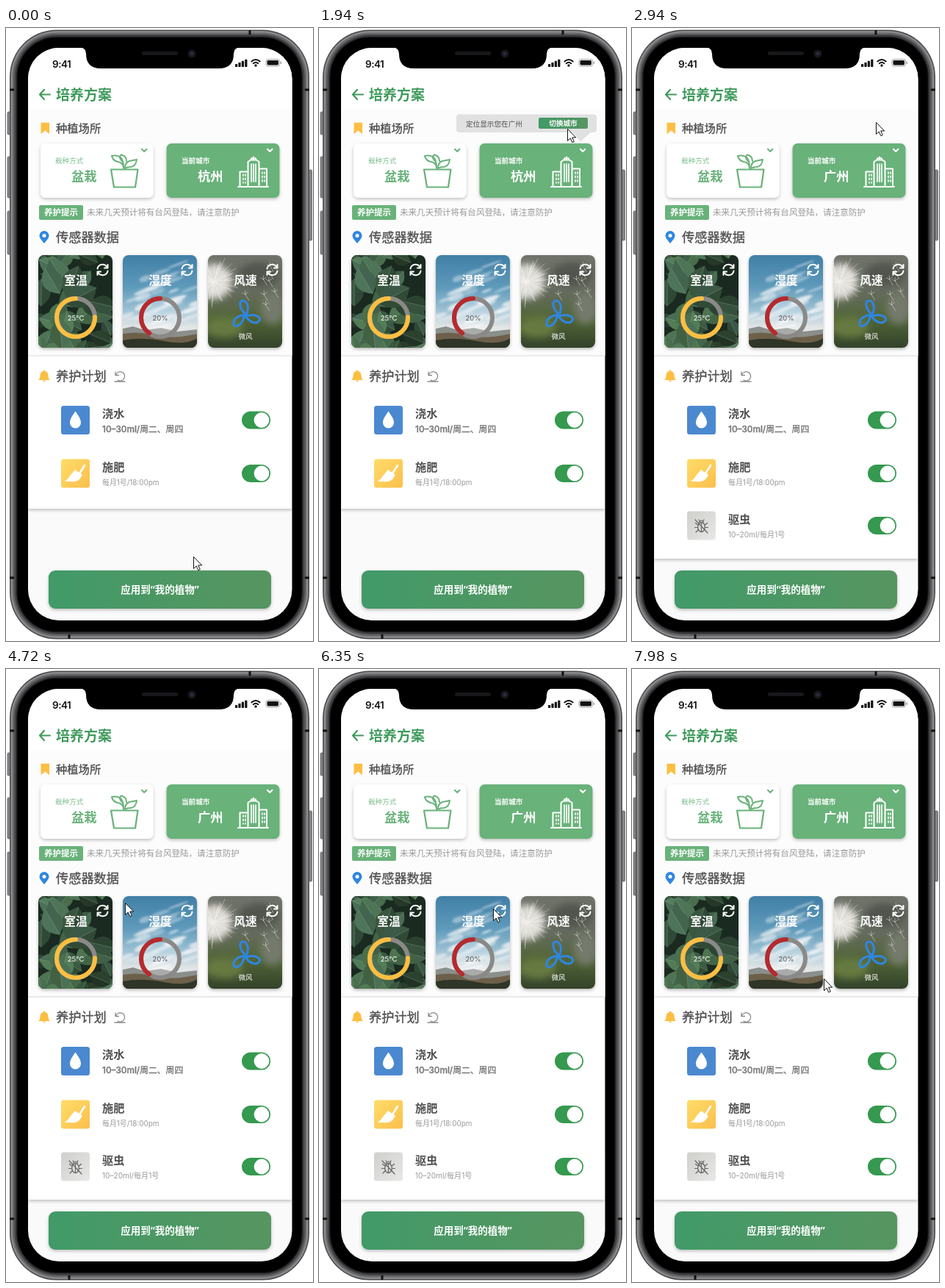
An HTML page for the animation above (8 s loop, 418 by 834 pixels).

```html
<!DOCTYPE html>
<html lang="zh-CN">
<head>
<meta charset="utf-8">
<title>培养方案</title>
<style>
html, body { margin: 0; width: 100%; height: 100%; overflow: hidden; background: #fff; }
svg { position: absolute; left: 0; top: 0; display: block; }
text { font-family: Inter, "Noto Sans CJK SC", "Noto Sans CJK", sans-serif; }
.card { top: 308.5px; border-radius: 8px; box-shadow: 0 2px 4px rgba(0,0,0,.28); }
</style>
</head>
<body>
<script>
const GREEN = '#69b27a', DEEP = '#35994f', AMBER = '#fdbe42', BLUE = '#2f86e0', INK = '#505050';
const LOOP = 8000, TICK = 77.4;

// cy is the optical middle of the line; weight 500 gets a hairline so it reads as medium
function label(s, x, cy, size, fill, weight = 400, anchor = 'start', extra = '') {
  const medium = weight === 500 ? `stroke="${fill}" stroke-width=".35"` : '';
  return `<text x="${x}" y="${cy + size * 0.37}" font-size="${size}" fill="${fill}" font-weight="${weight}" text-anchor="${anchor}" ${medium} ${extra}>${s}</text>`;
}
function box(x, y, w, h, r, fill, extra = '') {
  return `<rect x="${x}" y="${y}" width="${w}" height="${h}" rx="${r}" fill="${fill}" ${extra}/>`;
}
function line(d, color, width, extra = '') {
  return `<path d="${d}" fill="none" stroke="${color}" stroke-width="${width}" stroke-linecap="round" stroke-linejoin="round" ${extra}/>`;
}
function shape(d, fill, extra = '') { return `<path d="${d}" fill="${fill}" ${extra}/>`; }
function at(x, y, body, extra = '') { return `<g transform="translate(${x} ${y}) ${extra}">${body}</g>`; }
function grad(id, stops, dir = 'x2="0" y2="1"') {
  const list = stops.map(([o, c]) => `<stop offset="${o}" stop-color="${c}"/>`).join('');
  return `<linearGradient id="${id}" x1="0" y1="0" ${dir}>${list}</linearGradient>`;
}
function seeded(seed) {
  return () => (seed = (seed * 16807) % 2147483647) / 2147483647;
}
function repeat(n, fn) { return Array.from({ length: n }, (_, i) => fn(i)).join(''); }
function addSvg(w, h, body, cls = '') {
  const host = document.createElement('div');
  host.innerHTML = `<svg class="${cls}" width="${w}" height="${h}" viewBox="0 0 ${w} ${h}">${body}</svg>`;
  return document.body.appendChild(host.firstChild);
}

// ---- phone body ----
const phone = () => {
  const keys = [[2, 114, 31], [2, 175, 56], [2, 249, 59], [412.5, 193, 96]]
    .map(([x, y, h]) => box(x, y, 4, h, 1.5, '#858587', 'stroke="#4a4a4c" stroke-width=".7"')).join('');
  const rings = [[0, '#4a4a4c'], [1.5, '#88898b'], [4, '#646567'], [6.5, '#414143'], [9, '#1d1d1f'], [10.5, '#000']]
    .map(([d, c]) => box(5 + d, 2.5 + d, 408 - 2 * d, 829 - 2 * d, 64 - d, c)).join('');
  return keys + rings +
    '<path d="M5 84h6M5 748h6M407 84h6M407 748h6M332 3v6M86 825v6" stroke="#111" stroke-width="3"/>';
};

const notch = shape('M100 26q9 1 9 9q0 20 20 20H290q20 0 20-20q0-8 9-9z', '#000') +
  box(185, 32, 49, 5, 2.5, '#17181a') +
  '<circle cx="253" cy="35" r="5.5" fill="#17181d"/><circle cx="253" cy="35" r="2.4" fill="#2b2c3c"/>';

const status = label('9:41', 63, 49, 13.5, '#111', 600, 'start', 'letter-spacing="-.5"') +
  repeat(4, i => box(312 + i * 4.4, 49 - i * 2.1, 3.2, 4 + i * 2.1, 0.7, '#111')) +
  line('M334.3 45.4Q340 40.6 345.7 45.4M336.7 48.2Q340 45.4 343.3 48.2', '#111', 2) +
  '<circle cx="340" cy="51" r="1.7" fill="#111"/>' +
  box(354, 42.5, 18.5, 9.5, 2.6, 'none', 'stroke="#999" stroke-width=".9"') +
  box(355.5, 44, 15.5, 6.5, 1.4, '#111') + box(373.6, 45.6, 1.3, 3.4, 0.6, '#999');

// ---- page content ----
const chevron = (x, color) => line(`M${x - 3.3} 164.8L${x} 168L${x + 3.3} 164.8`, color, 2);

const pot = line('M143 192.5H179.5L176 216.5H147Z', GREEN, 2.2) +
  line('M160 191Q160 183 152 182Q145 180 144 174Q152 172 157 177Q160 181 160 190', GREEN, 2) +
  line('M159 182Q152 176 157 172.5Q164 174 164 181', GREEN, 2) +
  line('M162 191Q162 183 168 181L178 179Q177 188 170 189Q165 189 162 191', GREEN, 2);

const towers = line('M316 216H357M318.5 215V195.5H328M329.5 215V182L333 179.5H341L344.5 182V215M346 191.5H355V215M337 179V175.5', '#fff', 2) +
  line('M334 185V209M340 185V209M337 185V209', '#fff', 1.7) +
  line('M323 199V211M326 199V211M349 196V211M352 196V211', '#fff', 1.6, 'stroke-dasharray="2.2 3.2"') +
  line('M334 179V177H340V179', '#fff', 1.6);

const city = (name, extra) => label(name, 261, 202, 17.3, '#fff', 700, 'start', extra);

const place =
  shape('M47.5 128.700h11.500v15.500l-5.750-4.600l-5.750 4.600z', AMBER) +
  label('种植场所', 68, 136.7, 15.3, INK, 500) +
  box(47, 157, 153.5, 74, 7, '#fff', 'filter="url(#soft)"') +
  label('栽种方式', 67, 180, 9.6, '#7fbf90') + label('盆栽', 89, 202, 17.3, GREEN, 700) +
  pot + chevron(188.2, GREEN) +
  box(218.5, 157, 154, 74, 7, GREEN, 'filter="url(#soft)"') +
  label('当前城市', 239, 180, 9.6, '#fff', 500) +
  city('杭州', 'id="cityOld"') + city('广州', 'id="cityNew"') +
  towers + chevron(359.2, '#fff') +
  box(45, 241, 60, 20, 2, GREEN) +
  label('养护提示', 52, 251, 11.5, '#fff', 700) +
  label('未来几天预计将有台风登陆，请注意防护', 110, 251, 11.55, '#999');

const sensors =
  shape('M52 293C47 287 45.500 285 45.500 282.500A6.500 6.500 0 0 1 58.500 282.500C58.500 285 57 287 52 293Z', BLUE) +
  '<circle cx="52" cy="282.500" r="2.5" fill="#fff"/>' +
  label('传感器数据', 68, 285, 17.2, INK, 500);

const bell = shape('M52 465.500q1.500 0 1.500 1.400q4 1.200 4 6q0 4 2.500 6.100h-16q2.500-2.100 2.500-6.100q0-4.800 4-6q0-1.400 1.500-1.400zM50 479.500h4q-.4 1.800-2 1.800t-2-1.800z', AMBER);
const reset = line('M149 468V472.500H153.500M149.500 472A6.200 6.200 0 1 1 152 479M148 481H162', '#8a8a8a', 1.3);

const drop = shape('M94.500 521.500C99 528 102 532 102 537A7.500 7.500 0 0 1 87 537C87 532 90 528 94.500 521.500Z', '#fff');
const spade = line('M99.500 607L107 595', '#fff', 2.6) +
  shape('M94 601l10 7l-4 6q-5 4-12 3h-8q5-4 8-9z', '#fff');
const bug = `<ellipse cx="94.500" cy="679" rx="4.800" ry="6.500" fill="none" stroke="#666" stroke-width="1.300"/>` +
  line('M94.500 673V685M91.500 672Q94.500 668 97.500 672M91 669L92.500 671M98 669L96.500 671M89.500 676L86.500 673.500M89.500 679.500H85.500M90 683L87 686M99.500 676L102.500 673.500M99.500 679.500H103.500M99 683L102 686M86 669L103 687', '#666', 1.2);

function row(cy, fill, icon, title, sub, size, color, weight) {
  return box(75, cy - 19.5, 39, 39, 3.5, fill) + icon +
    label(title, 131, cy - 9, 15.2, INK, 700) + label(sub, 131, cy + 12.5, size, color, weight) +
    box(321, cy - 12, 39, 24, 12, DEEP) + `<circle cx="348" cy="${cy}" r="10.400" fill="#fff"/>`;
}

const sheet = h => box(30, 447, 359, h, 0, '#fff', 'filter="url(#soft)"');
const plan = sheet(207) +
  '<g id="more">' + sheet(275) +
  row(677, 'url(#silver)', bug, '驱虫', '10–20ml/每月1号', 10.1, '#999') + '</g>' +
  box(30, 445, 359, 1.2, 0, '#e9e9e9') + bell + reset +
  label('养护计划', 68, 474, 17.2, INK, 500) +
  row(533.5, '#4a88d0', drop, '浇水', '10–30ml/周二、周四', 11.8, '#777', 500) +
  row(606, 'url(#gold)', spade, '施肥', '每月1号/18:00pm', 9.9, '#999');

const apply = box(58, 738, 303, 52, 9, 'url(#leaf)', 'filter="url(#soft)"') +
  label('应用到“我的植物”', 209.5, 764.5, 13.5, '#fff', 700, 'middle',
    `style="font-family:'Noto Sans','Noto Sans CJK SC',sans-serif"`);

const tip = '<g id="tip">' +
  shape('M191 117.500H374Q378 117.500 378 121.500V138Q378 142 374 142H370L356 154.500L345 142H191Q187 142 187 138V121.500Q187 117.500 191 117.500Z', '#e1e1e1') +
  label('定位显示您在广州', 200, 130, 9.65, '#4d4d4d') +
  box(299, 122, 67, 15, 2, 'url(#leaf)') +
  label('切换城市', 332.5, 129.7, 9.6, '#fff', 500, 'middle') + '</g>';

addSvg(418, 834, `<defs>
  <filter id="soft" x="-10%" y="-20%" width="120%" height="150%"><feDropShadow dx="0" dy="2" stdDeviation="2" flood-opacity=".24"/></filter>
  <clipPath id="screen"><rect x="30" y="27" width="359.500" height="779" rx="42"/></clipPath>
  ${grad('leaf', [[0, '#419a68'], [1, '#579561']], 'x2="1" y2="0"')}
  ${grad('gold', [[0, '#ffdc69'], [1, '#fbbf4c']], 'x2="1" y2="1"')}
  ${grad('silver', [[0, '#cfcfcc'], [1, '#e8e8e7']], 'x2="1" y2="1"')}
  </defs>` + phone() + '<g clip-path="url(#screen)">' +
  box(30, 27, 360, 780, 0, '#fafafa') + box(30, 27, 360, 83, 0, '#fff') + box(30, 110, 360, 336, 0, '#fcfcfc') +
  line('M60 90.500H46.500M52 84L46 90.500L52 97', '#3f9b5c', 2.2) +
  label('培养方案', 68, 90.5, 19, '#3f9b5c', 700) +
  place + sensors + plan + apply + tip + '</g>' + notch + status);

// ---- sensor cards ----
const refresh = at(87.5, 20, line('M-7 -1.500A7 7 0 0 1 5.500 -4.500M7 -7V-2.500H2.500M7 1.500A7 7 0 0 1 -5.500 4.500M-7 7V2.500H-2.500', '#fff', 2));

function ring(share, color, text, ink) {
  const len = 2 * Math.PI * 26;
  const circle = `<circle r="26" fill="none" stroke-width="6"`;
  return at(51, 85, `${circle} stroke="#8b8987"/>` +
    `${circle} stroke="${color}" stroke-linecap="round" stroke-dasharray="${len * share} ${len}" transform="scale(-1 1) rotate(-90)"/>` +
    label(text, 0, 0, 9.5, ink, 400, 'middle'));
}

function leaves() {
  const rnd = seeded(41);
  return box(0, 0, 101, 126, 0, '#1a2a20') + repeat(40, i => {
    const l = 24 + rnd() * 24, w = l * 0.68, light = 15 + rnd() * 22;
    const tone = k => `hsl(${122 + rnd() * 20} 20% ${light + k}%)`;
    return at(rnd() * 101, rnd() * 136,
      shape(`M0 0Q${w} ${-l / 2} 0 ${-l}Q${-w} ${-l / 2} 0 0Z`, tone(0)) +
      shape(`M0 0Q${w} ${-l / 2} 0 ${-l}Z`, tone(5)) +
      line(`M0 0V${-l}`, '#9ab696', 0.6, 'opacity=".5"'), `rotate(${rnd() * 360})`);
  });
}

function sky() {
  const rnd = seeded(7);
  return `<defs>${grad('sky', [[0, '#417fa6'], [0.35, '#5f9abb'], [0.6, '#9fc2d4'], [0.78, '#e3e6e6']])}
    <filter id="mist"><feGaussianBlur stdDeviation="1.500"/></filter></defs>` +
    box(0, 0, 101, 126, 0, 'url(#sky)') + '<g filter="url(#mist)">' +
    repeat(34, () => `<ellipse cx="${rnd() * 101}" cy="${14 + rnd() * 84}" rx="${7 + rnd() * 15}" ry="${1 + rnd() * 3}" fill="#f4f6f7" opacity="${0.3 + rnd() * 0.5}" transform="rotate(-20 50 60)"/>`) +
    '</g>' + shape('M0 100L14 97L30 102L52 99L74 104L101 101V126H0Z', '#8b8f8c') +
    shape('M0 107Q22 103 44 109T101 107V126H0Z', '#6d604a') +
    shape('M0 116Q25 111 56 117T101 113V126H0Z', '#2f3527');
}

function dandelion() {
  const rnd = seeded(23);
  const seeds = repeat(80, () => {
    const a = rnd() * Math.PI * 2, r = 14 + rnd() * 22;
    return line(`M8 36L${8 + r * Math.cos(a)} ${36 + r * Math.sin(a)}`, '#f2f0ec', 0.8, 'opacity=".5"');
  });
  return `<defs>${grad('field', [[0, '#70736b'], [0.4, '#656b5e'], [0.68, '#526638'], [1, '#33422a']])}
    <filter id="blur" x="-50%" y="-50%" width="200%" height="200%"><feGaussianBlur stdDeviation="5"/></filter></defs>` +
    box(0, 0, 101, 126, 0, 'url(#field)') + '<g filter="url(#blur)">' +
    '<circle cx="8" cy="36" r="24" fill="#dddbd5"/><ellipse cx="70" cy="26" rx="28" ry="16" fill="#51554d"/>' +
    '<ellipse cx="22" cy="98" rx="26" ry="14" fill="#66793f"/><ellipse cx="88" cy="72" rx="16" ry="22" fill="#757a6c"/></g>' +
    seeds + repeat(9, () => {
      const x = 45 + rnd() * 48, y = 8 + rnd() * 62;
      return line(`M${x} ${y}l5 8m-5 -8l-4 -2m4 2l0 -5m0 5l4 -3`, '#eeece6', 0.8, 'opacity=".6"');
    });
}

const fan = at(51, 82, repeat(3, i =>
  line('M-1 -3C-8 -9 -9 -20 -4 -20C3 -20 5 -11 2 -3', BLUE, 3, `transform="rotate(${i * 120})"`)) +
  `<circle r="3" fill="${BLUE}"/>`);

function card(x, photo, title, gauge) {
  const el = addSvg(101, 126, photo + label(title, 51, 34, 15.7, '#fff', 700, 'middle') + refresh + gauge, 'card');
  el.style.left = x + 'px';
  return el;
}
const cards = [
  card(44, leaves(), '室温', ring(0.75, AMBER, '25℃', '#fff')),
  card(159, sky(), '湿度', '<circle cx="51" cy="85" r="24" fill="#fff" opacity=".25"/>' + ring(0.4, '#b62a2e', '20%', '#555')),
  card(274.5, dandelion(), '风速', fan + label('微风', 51, 110, 9.6, '#fff', 400, 'middle'))
];

addSvg(418, 834, '<g id="mouse"><circle id="press" r="15" fill="#ff0" opacity=".47"/>' +
  '<path d="M.5 .5V16.500L4.200 13L6.800 18.700L9.300 17.600L6.700 12H11.700Z" fill="#fff" stroke="#111" stroke-width="1"/></g>');

// ---- motion ----
const route = [
  [0, 255, 719], [700, 255, 719], [1006, 255, 705], [1240, 255, 705], [1935, 338, 137], [2090, 336, 130],
  [2245, 336, 130], [2322, 332, 128], [3870, 332, 128], [4721, 162, 318], [5108, 135, 329], [5805, 135, 329],
  [6347, 237, 326], [6424, 237, 326], [6579, 247, 326], [7740, 247, 326], [7972, 261, 421], [8130, 268, 480]
];
const presses = [[2390, 2470], [5250, 5410], [6570, 6730]];
const flips = [[0, 5372], [1, 6752]];
const $ = id => document.getElementById(id);
const ramp = (t, a, b) => Math.min(1, Math.max(0, (t - a) / (b - a)));

// speed through a stop: zero at rests and turns, harmonic mean where the hand keeps going
function speed(i, axis) {
  if (i < 1 || i >= route.length - 1) return 0;
  const pace = k => (route[k + 1][axis] - route[k][axis]) / (route[k + 1][0] - route[k][0]);
  const a = pace(i - 1), b = pace(i);
  return a * b > 0 ? 2 * a * b / (a + b) : 0;
}

function pointer(t) {
  const i = Math.max(1, route.findIndex(k => k[0] >= t));
  const from = route[i - 1], to = route[i], span = to[0] - from[0];
  const p = (t - from[0]) / span, e = p * p * (3 - 2 * p);
  return [1, 2].map(axis => from[axis] + (to[axis] - from[axis]) * e +
    span * p * (1 - p) * ((1 - p) * speed(i - 1, axis) - p * speed(i, axis)));
}

function draw(time) {
  const t = Math.max(0, Math.floor((time % LOOP + 6) / TICK) * TICK);
  const [x, y] = pointer(t);
  $('mouse').setAttribute('transform', `translate(${x.toFixed(1)} ${y.toFixed(1)})`);
  $('press').style.display = presses.some(([a, b]) => t >= a && t < b) ? '' : 'none';

  const dissolve = ramp(t, 2570, 2930);
  $('tip').setAttribute('opacity', ramp(t, 700, 1006) * (1 - dissolve));
  $('cityOld').setAttribute('opacity', 1 - dissolve);
  $('cityNew').setAttribute('opacity', dissolve);
  $('more').setAttribute('opacity', dissolve);

  for (const [i, start] of flips) {
    const turn = 180 * ramp(t, start, start + 200);
    const angle = turn < 90 ? turn : turn - 180;
    cards[i].style.transform = angle ? `perspective(550px) rotateX(${angle}deg)` : 'none';
  }
}

const begin = performance.now();
function loop() {
  draw(performance.now() - begin);
  requestAnimationFrame(loop);
}
loop();
</script>
</body>
</html>
```
